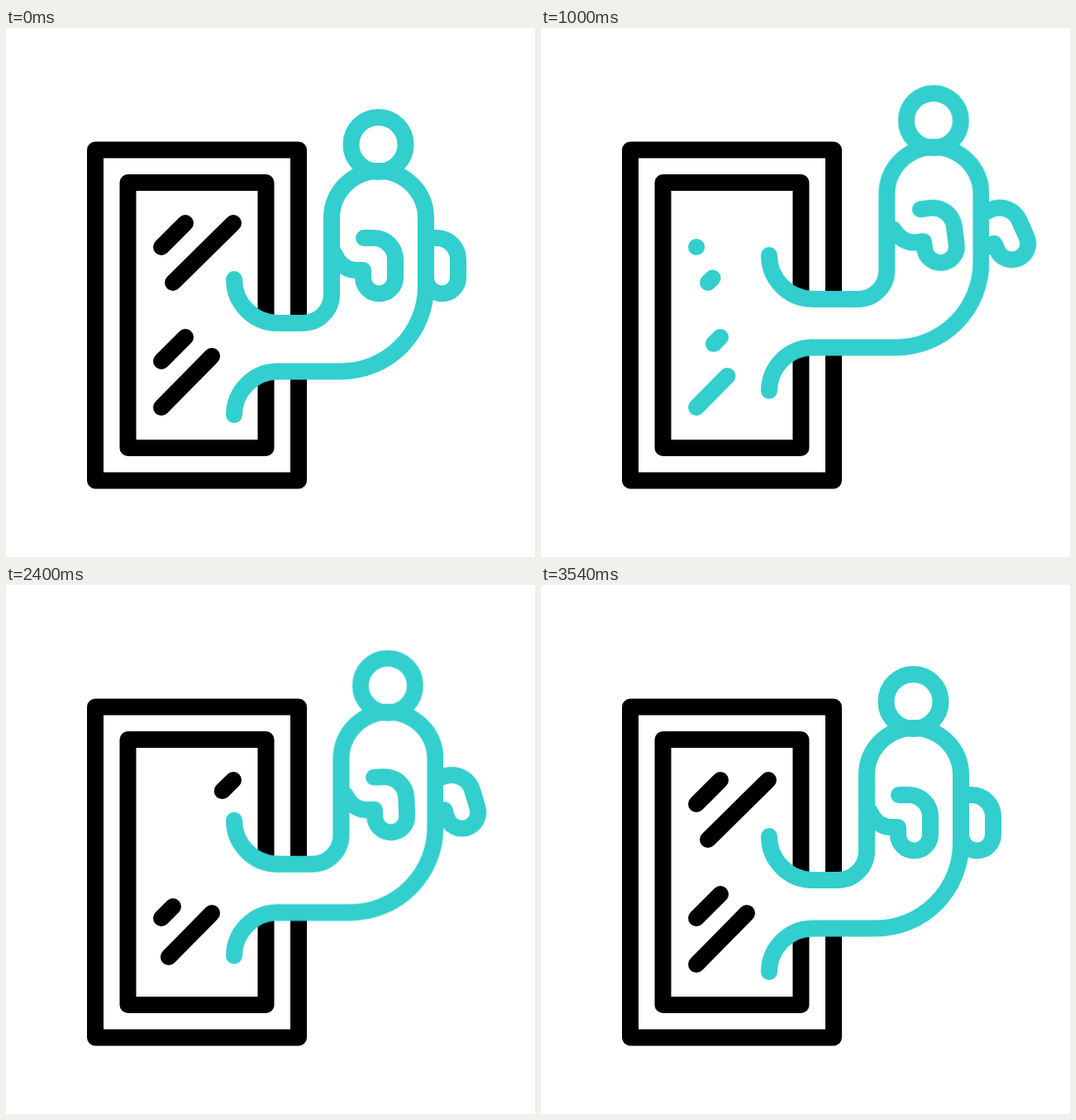
Write an HTML page without scripts that moves like this. It is 640 px wide and 640 px high and loops after 3.6 s.

```html
<!DOCTYPE html>
<html lang="en">
<head>
<meta charset="utf-8">
<title>Hand reaching out of a mirror</title>
<style>
  html, body { margin: 0; width: 100%; height: 100%; overflow: hidden; background: #fff; }
  svg { display: block; width: 100%; height: 100%; }

  path, rect, circle { fill: none; stroke: #000; stroke-width: 20; stroke-linecap: round; stroke-linejoin: round; }
  .teal, .teal * { stroke: #33cece; }
  .teal .skin { fill: #fff; }
  .teal .cover { fill: #fff; stroke: none; }

  .sleeve, .hand, .hook, .thumb, .shine path {
    animation: 3.6s cubic-bezier(.333, 0, .667, 1) infinite;
  }

  /* Arm: the sleeve only rises and falls, the hand also sways. */
  .sleeve { animation-name: lift; }
  .hand { animation-name: sway; }
  .hook { animation-name: curl; transform-origin: 390px 240px; }
  .thumb { animation-name: flick; animation-timing-function: linear; transform-origin: 508px 254px; }

  @keyframes lift {
    0%, 2.2%, 98.3%, 100% { transform: translate(0, 0); }
    25%, 75% { transform: translate(0, -30.7px); }
    50% { transform: translate(0, 13.2px); }
  }
  @keyframes sway {
    0%, 2.2%, 98.3%, 100% { transform: translate(0, 0); }
    25% { transform: translate(26px, -30.5px); }
    50% { transform: translate(-19px, 12.8px); }
    75% { transform: translate(22px, -30.5px); }
  }
  @keyframes curl {
    0%, 2.2%, 98.3%, 100% { transform: rotate(0deg); }
    25% { transform: rotate(-8deg); }
    50% { transform: rotate(8.5deg); }
    75% { transform: rotate(-6.5deg); }
  }
  @keyframes flick {
    0%, 2.2%, 98.3%, 100% { transform: rotate(0deg); }
    15% { transform: rotate(-11deg); }
    17.8% { transform: rotate(-16deg); }
    25% { transform: rotate(-43deg); }
    27.8% { transform: rotate(-24deg); }
    30% { transform: rotate(-18.5deg); }
    50% { transform: rotate(15deg); }
    60% { transform: rotate(-6deg); }
    66.7% { transform: rotate(-16.5deg); }
    75% { transform: rotate(-45deg); }
    84.4% { transform: rotate(-14deg); }
    90% { transform: rotate(-5deg); }
  }

  /* Reflections: black wipes out, teal passes through, black returns. */
  .shine path { stroke-dasharray: 1 3; }
  .a { animation-name: black-a !important; }
  .b { animation-name: black-b !important; }
  .c { animation-name: black-c !important; }
  .d { animation-name: black-d !important; }
  .teal .a { animation-name: teal-a !important; }
  .teal .b { animation-name: teal-b !important; }
  .teal .c { animation-name: teal-c !important; }
  .teal .d { animation-name: teal-d !important; }

  @keyframes black-a {
    0%, 16.6%, 80.6%, 100% { stroke-dashoffset: 0; }
    27.2%, 67% { stroke-dashoffset: -1.001; }
  }
  @keyframes black-b {
    0%, 14.6%, 76.8%, 100% { stroke-dashoffset: 0; }
    24.7%, 62.9% { stroke-dashoffset: -1.001; }
  }
  @keyframes black-c {
    0%, 8.9%, 73.8%, 100% { stroke-dashoffset: 0; }
    21.4%, 59.9% { stroke-dashoffset: -1.001; }
  }
  @keyframes black-d {
    0%, 3.6%, 70%, 100% { stroke-dashoffset: 0; }
    16.9%, 56.2% { stroke-dashoffset: -1.001; }
  }
  @keyframes teal-a {
    0%, 27.2% { stroke-dashoffset: 1.001; }
    44.4%, 44.7% { stroke-dashoffset: 0; }
    57.1%, 100% { stroke-dashoffset: -1.001; }
  }
  @keyframes teal-b {
    0%, 24.7% { stroke-dashoffset: 1.001; }
    43% { stroke-dashoffset: 0; }
    52.9%, 100% { stroke-dashoffset: -1.001; }
  }
  @keyframes teal-c {
    0%, 21.4% { stroke-dashoffset: 1.001; }
    39.8% { stroke-dashoffset: 0; }
    50%, 100% { stroke-dashoffset: -1.001; }
  }
  @keyframes teal-d {
    0%, 17.2% { stroke-dashoffset: 1.001; }
    35.6% { stroke-dashoffset: 0; }
    47.8%, 100% { stroke-dashoffset: -1.001; }
  }
</style>
</head>
<body>
<svg viewBox="0 0 640 640">
  <defs>
    <clipPath id="outside"><path d="M328 0H640V640H328Z"/></clipPath>
  </defs>

  <rect x="108" y="147.5" width="246" height="400"/>
  <rect x="147.5" y="187" width="167" height="321"/>

  <g class="shine">
    <path class="a" pathLength="1" d="M188 265L217 236"/>
    <path class="b" pathLength="1" d="M202 308L275 236"/>
    <path class="c" pathLength="1" d="M217 374L188 403"/>
    <path class="d" pathLength="1" d="M188 459L249 397"/>
  </g>
  <g class="shine teal">
    <path class="a" pathLength="1" d="M188 265L217 236"/>
    <path class="b" pathLength="1" d="M202 308L275 236"/>
    <path class="c" pathLength="1" d="M217 374L188 403"/>
    <path class="d" pathLength="1" d="M188 459L249 397"/>
  </g>

  <g class="teal">
    <g class="sleeve">
      <path class="cover" d="M276 304A53 53 0 0 0 329 357V415.5A53 53 0 0 0 276 468Z"/>
    </g>
    <g clip-path="url(#outside)">
      <g class="hand">
        <path class="thumb" d="M508 254H521a26 26 0 0 1 26 26V302a19.5 19.5 0 0 1-39 0V293H490"/>
        <path class="skin" d="M270 357H359a35 35 0 0 0 35-35V230a57 57 0 0 1 114 0V312.5a103 103 0 0 1-103 103H270"/>
        <circle cx="450.5" cy="141" r="33"/>
        <path class="hook" d="M433 254H445a26 26 0 0 1 26 26V302a19.5 19.5 0 0 1-39 0V293H422a28 28 0 0 1-24-19"/>
      </g>
    </g>
    <g class="sleeve">
      <path stroke-linecap="butt" d="M276 304A53 53 0 0 0 328 357M276 468A53 53 0 0 1 328 415.5"/>
    </g>
  </g>
</svg>
</body>
</html>
```
